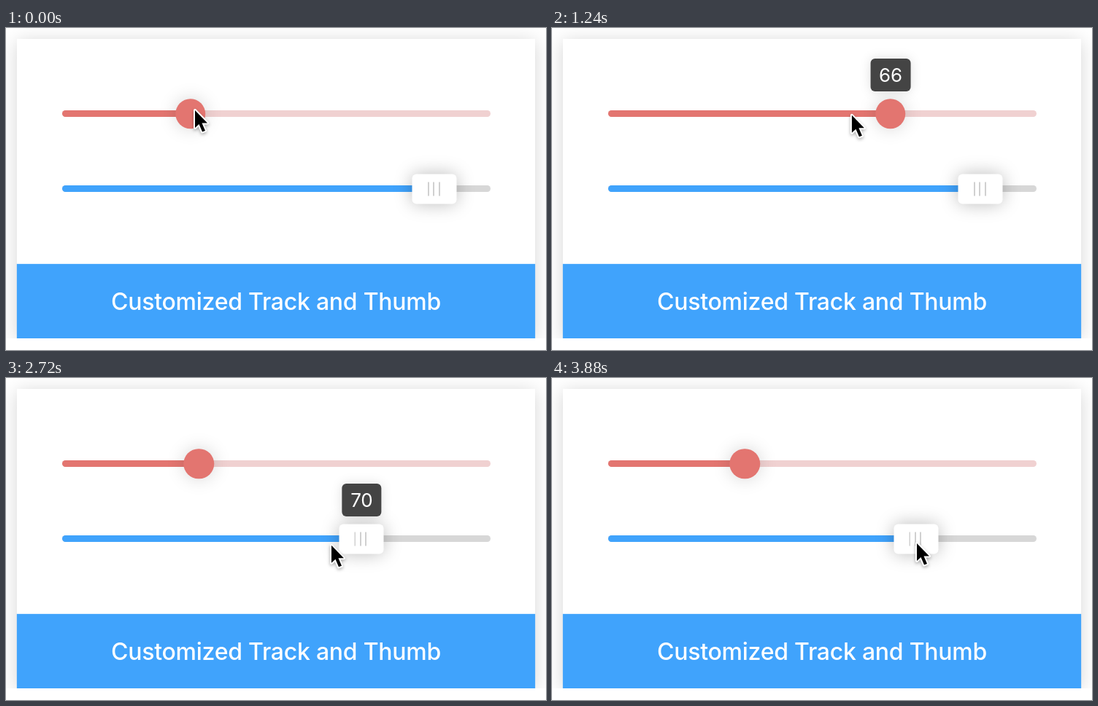
Animation of 740 by 442 pixels, one loop 3920 ms. Source, as an HTML page:

```html
<!DOCTYPE html>
<html lang="en">
<head>
<meta charset="utf-8">
<title>Customized Track and Thumb</title>
<style>
  html, body { margin: 0; width: 740px; height: 442px; overflow: hidden; background: #fff; }
  body { position: relative; font-family: Inter, sans-serif; }
  div { position: absolute; box-sizing: border-box; }
  #clip { left: 0; top: 0; width: 740px; height: 426px; overflow: hidden; }
  #card { left: 15px; top: 15px; width: 710px; height: 411px; background: #fff;
    box-shadow: 0 3px 24px rgba(0, 0, 0, .17); }
  #caption { left: 15px; top: 324px; width: 710px; height: 102px; background: #40a3fc; color: #fff;
    box-shadow: 0 0 1px #40a3fc; font-size: 32px; font-weight: 500; line-height: 104px;
    letter-spacing: -.25px; text-align: center; white-space: nowrap; }
  .slider { left: 76.5px; width: 587px; height: 9px; border-radius: 4.5px; }
  .fill { left: 0; top: 0; height: 9px; border-radius: 4.5px; }
  .thumb { top: 4.8px; transform: translate(-50%, -50%); }
  .tip { top: -71px; height: 45px; padding: 0 11.5px; border-radius: 6px; transform: translateX(-50%);
    background: #444; color: #fff; font-size: 26px; line-height: 46px; letter-spacing: -.2px;
    box-shadow: 0 0 16px rgba(0, 0, 0, .13); }
  #red { top: 113px; background: #f0d1d1; }
  #red .fill { background: #e37570; }
  #red .thumb { width: 41.5px; height: 41.5px; border-radius: 50%; background: #e37570;
    box-shadow: 0 0 24px rgba(0, 0, 0, .17); }
  #blue { top: 216px; background: #d7d7d7; }
  #blue .fill { background: #40a3fc; }
  #blue .thumb { width: 61px; height: 41px; border-radius: 6px; background: #fff;
    box-shadow: 0 0 24px rgba(0, 0, 0, .27); }
  .grip { left: 20.5px; top: 11.5px; width: 18px; height: 19px;
    background: repeating-linear-gradient(90deg, #d0d0d0 0 2px, transparent 2px 7.5px); }
  #cursor { position: absolute; left: -6px; top: -6px; overflow: visible;
    filter: drop-shadow(0 2px 2px rgba(0, 0, 0, .3)); }
</style>
</head>
<body>
<div id="clip">
  <div id="card"></div>
  <div id="caption">Customized Track and Thumb</div>
  <div id="red" class="slider">
    <div class="fill"></div><div class="thumb"></div><div class="tip"></div>
  </div>
  <div id="blue" class="slider">
    <div class="fill"></div><div class="thumb"><div class="grip"></div></div><div class="tip"></div>
  </div>
</div>
<svg id="cursor" width="34" height="46" viewBox="-6 -6 34 46">
  <path d="M0 0V24L5.5 19L10 29.5L14 28L9.5 17.5H17Z" fill="#000" stroke="#fff"
    stroke-width="4" stroke-linejoin="round" paint-order="stroke"/>
</svg>
<script>
const LOOP = 3920, STEP = 40, LEFT = 76.5, UNIT = 5.87;

// Pointer moves: from ms, to ms, target x, target y
const home = { x: 259, y: 113 };
const moves = [
  [100, 872, 564, 113],
  [1075, 1395, 271.5, 126],
  [1500, 1600, 265.5, 126],
  [1680, 2320, 584.5, 228],
  [2500, 3092, 140, 234],
  [3100, 3600, 500, 227]
];

const sliders = [
  { id: 'red', start: 30, down: 120, up: 1600 },
  { id: 'blue', start: 87, down: 2520, up: 3760 }
].map(s => {
  const find = name => document.querySelector(`#${s.id} .${name}`);
  return { ...s, fill: find('fill'), thumb: find('thumb'), tip: find('tip') };
});
const cursor = document.getElementById('cursor');

const clamp = v => Math.max(0, Math.min(1, v));
const ease = u => u * u * (3 - 2 * u);

function pointer(t) {
  let { x, y } = home;
  for (const [from, to, toX, toY] of moves) {
    const k = ease(clamp((t - from) / (to - from)));
    x += (toX - x) * k;
    y += (toY - y) * k;
  }
  return { x, y };
}

// While held, the thumb snaps to whole values one step behind the pointer
function valueAt(s, t) {
  if (t < s.down) return s.start;
  const { x } = pointer(Math.min(t - STEP, s.up));
  return Math.round((x - 1 - LEFT) / UNIT);
}

function draw(t) {
  for (const s of sliders) {
    const value = valueAt(s, t);
    s.fill.style.width = s.thumb.style.left = s.tip.style.left = value * UNIT + 'px';
    s.tip.textContent = value;
    s.tip.style.opacity = Math.min(clamp((t - s.down) / 80), clamp((s.up + 80 - t) / 80));
  }
  const { x, y } = pointer(t);
  cursor.style.transform = `translate(${x}px, ${y}px)`;
}

const origin = performance.now();
function tick() {
  const t = (performance.now() - origin) % LOOP;
  draw(Math.floor(t / STEP) * STEP);
  requestAnimationFrame(tick);
}
tick();
</script>
</body>
</html>
```
